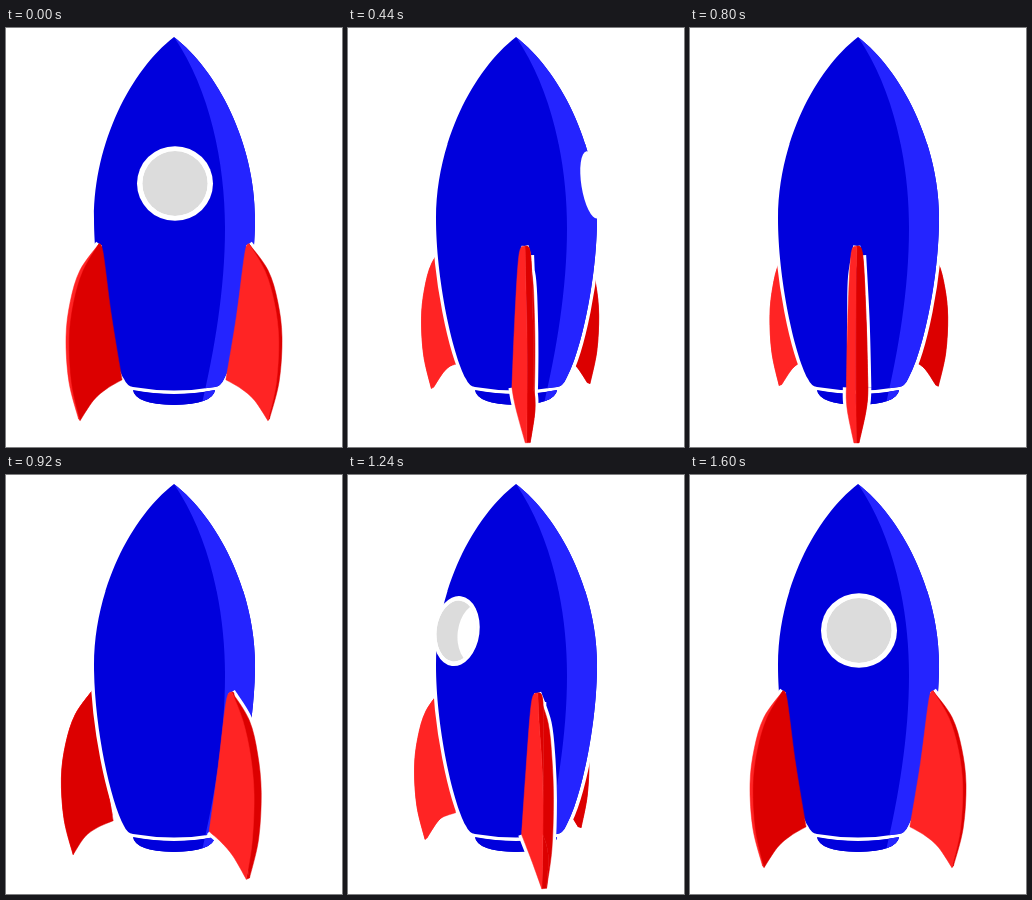
Recreate the animation shown at these times as an HTML page. Size 336 by 419 pixels, loop 1640 ms.

```html
<!DOCTYPE html>
<html lang="en">
<head>
<meta charset="utf-8">
<title>Spinning rocket</title>
<style>
  html, body { margin: 0; width: 100%; height: 100%; overflow: hidden; background: #fff; }
  svg { display: block; width: 100vw; height: 100vh; }
</style>
</head>
<body>
<svg viewBox="0 0 336 419">
  <defs>
    <path id="hull" d="M168 9C125 42 88 115 88 190C88 250 104 325 118 351Q121 358 127 359Q168 366 209 359Q215 358 218 351C233 325 249 250 249 190C249 115 211 42 168 9Z"/>
    <path id="base" d="M127 362Q168 370 209 362Q207 376 168 377Q129 376 127 362Z"/>
    <clipPath id="hullClip"><use href="#hull"/><use href="#base"/></clipPath>
    <clipPath id="paneClip"><ellipse id="paneShape"/></clipPath>
  </defs>
  <rect width="336" height="419" fill="#fff"/>
  <g id="back"></g>
  <g fill="#0000dc">
    <use href="#base" stroke="#fff" stroke-width="6"/>
    <use href="#base"/>
    <use href="#hull" stroke="#fff" stroke-width="7" stroke-linejoin="round"/>
    <use href="#hull"/>
    <use href="#base"/>
    <path clip-path="url(#hullClip)" fill="#2424ff" d="M168 9C204 62 219 135 219 200C219 262 208 325 195 380H260V9Z"/>
  </g>
  <g id="window">
    <ellipse id="rim" fill="#fff"/>
    <g clip-path="url(#paneClip)">
      <ellipse id="pane"/>
      <ellipse id="shade"/>
    </g>
  </g>
  <g id="front"></g>
</svg>
<script>
const $ = id => document.getElementById(id);
const FRAME = 40, LOOP = 1640, TURN = 1600;
const CX = 168, EYE = 192, DEPTH = 0.0019;
const BRIGHT = '#ff2424', DARK = '#dc0000', GREY = '#dcdcdc';
const rad = deg => deg * Math.PI / 180;

// Fin curves: [radius, height, half thickness]
const ROOT = [[80, 214, 0], [78, 222, 5], [71, 280, 8], [61, 340, 9.5]];
const FOOT = [[61, 340, 9.5], [76, 346, 9], [88, 355, 7], [99, 373, 2]];
const EDGE = [[99, 373, 2], [107.5, 338, 4], [110, 298, 4.5], [106, 266, 4.5], [97, 238, 4], [80, 214, 0]];

function project([r, h, w], a, side) {
  const s = Math.sin(a), c = Math.cos(a), t = w * side;
  const k = 1 / (1 - DEPTH * (r * c - t * s));
  return [CX + k * (r * s + t * c), EYE + (h - EYE) * k];
}

const fmt = p => p[0].toFixed(2) + ' ' + p[1].toFixed(2);

// Smooth curve through points, continuing from the first one
function curve(pts) {
  let d = '';
  for (let i = 0; i < pts.length - 1; i++) {
    const p = pts[i], q = pts[i + 1];
    const before = pts[i - 1] || p, after = pts[i + 2] || q;
    const c1 = p.map((v, j) => v + (q[j] - before[j]) / 6);
    const c2 = q.map((v, j) => v - (after[j] - p[j]) / 6);
    d += `C${fmt(c1)} ${fmt(c2)} ${fmt(q)}`;
  }
  return d;
}

function line(parts, a, side) {
  const runs = parts.map(part => part.map(p => project(p, a, side)));
  return 'M' + runs.map(run => fmt(run[0]) + curve(run)).join('L');
}

// Two-tone light: faces turned to the left are bright
const tone = (deg, side) => deg + side * 90 < -8 ? BRIGHT : DARK;

function fin(deg) {
  const a = rad(deg);
  const far = deg > -4 ? 1 : -1, near = -far;
  // The crease slides to the near rim as the fin turns sideways
  const slide = Math.min(1, 4 * Math.abs(Math.sin(a)));
  const crease = k => EDGE.map(([r, h, w]) => [r, h, w * k]);
  const rim = [FOOT, EDGE];
  const white = line(rim, a, far) + line(rim, a, near) + line([ROOT.slice(1)], a, far);
  const shape = (edge, side) => {
    const fill = tone(deg, side);
    return `<path d="${line([ROOT, FOOT, edge], a, side)}Z" fill="${fill}" stroke="${fill}" stroke-width=".5"/>`;
  };
  return `<path d="${white}" fill="none" stroke="#fff" stroke-width="7"/>` +
    shape(EDGE, far) + shape(crease(-slide), far) + shape(crease(slide), near);
}

function ellipse(id, cx, cy, rx, ry, fill) {
  const el = $(id);
  Object.entries({ cx, cy, rx, ry }).forEach(([k, v]) => el.setAttribute(k, v.toFixed(2)));
  if (fill) el.setAttribute('fill', fill);
}

const wrap = deg => ((deg + 180) % 360 + 360) % 360 - 180;

function drawWindow(turn) {
  const deg = wrap(turn), a = rad(deg), s = Math.sin(a), c = Math.cos(a);
  const shown = Math.abs(deg) < 92;
  $('window').style.display = shown ? '' : 'none';
  if (!shown) return;
  const k = 1 / (1 - DEPTH * 80 * c);
  const x = 169 + (73 + 6 * s ** 4) * k * s, y = 155.5 + 2 * s ** 4;
  const rx = Math.max(4, 38 * Math.cos(1.13 * a)), ry = 37.3 - 4 * s * s;
  const ix = rx * 0.86, iy = ry * 0.87;
  const right = deg >= 0;
  const shift = right ? -45 * s : 2 * ix * (1 + 0.64 * s);
  $('window').setAttribute('transform', `rotate(${-10 * s} ${x} ${y})`);
  ellipse('rim', x, y, rx, ry);
  ellipse('paneShape', x, y, ix, iy);
  ellipse('pane', x, y, ix, iy, right ? '#fff' : GREY);
  ellipse('shade', x + shift, y, ix, iy, right ? GREY : '#fff');
}

function turnAt(ms) {
  const step = Math.floor((ms % LOOP) / FRAME) * FRAME;
  const p = Math.min(step / TURN, 1);
  return 360 * p * p * (3 - 2 * p) - 3 * Math.sin(Math.PI * p) * (1 - p) ** 2;
}

function draw(ms) {
  const turn = turnAt(ms);
  const fins = [-60, 60, 180].map(d => wrap(d + turn))
    .sort((p, q) => Math.cos(rad(p)) - Math.cos(rad(q)));
  const inFront = d => Math.cos(rad(d)) > 0.2;
  $('back').innerHTML = fins.filter(d => !inFront(d)).map(fin).join('');
  $('front').innerHTML = fins.filter(inFront).map(fin).join('');
  drawWindow(turn);
}

const start = performance.now();
function tick() {
  draw(performance.now() - start);
  requestAnimationFrame(tick);
}
draw(0);
requestAnimationFrame(tick);
</script>
</body>
</html>
```
